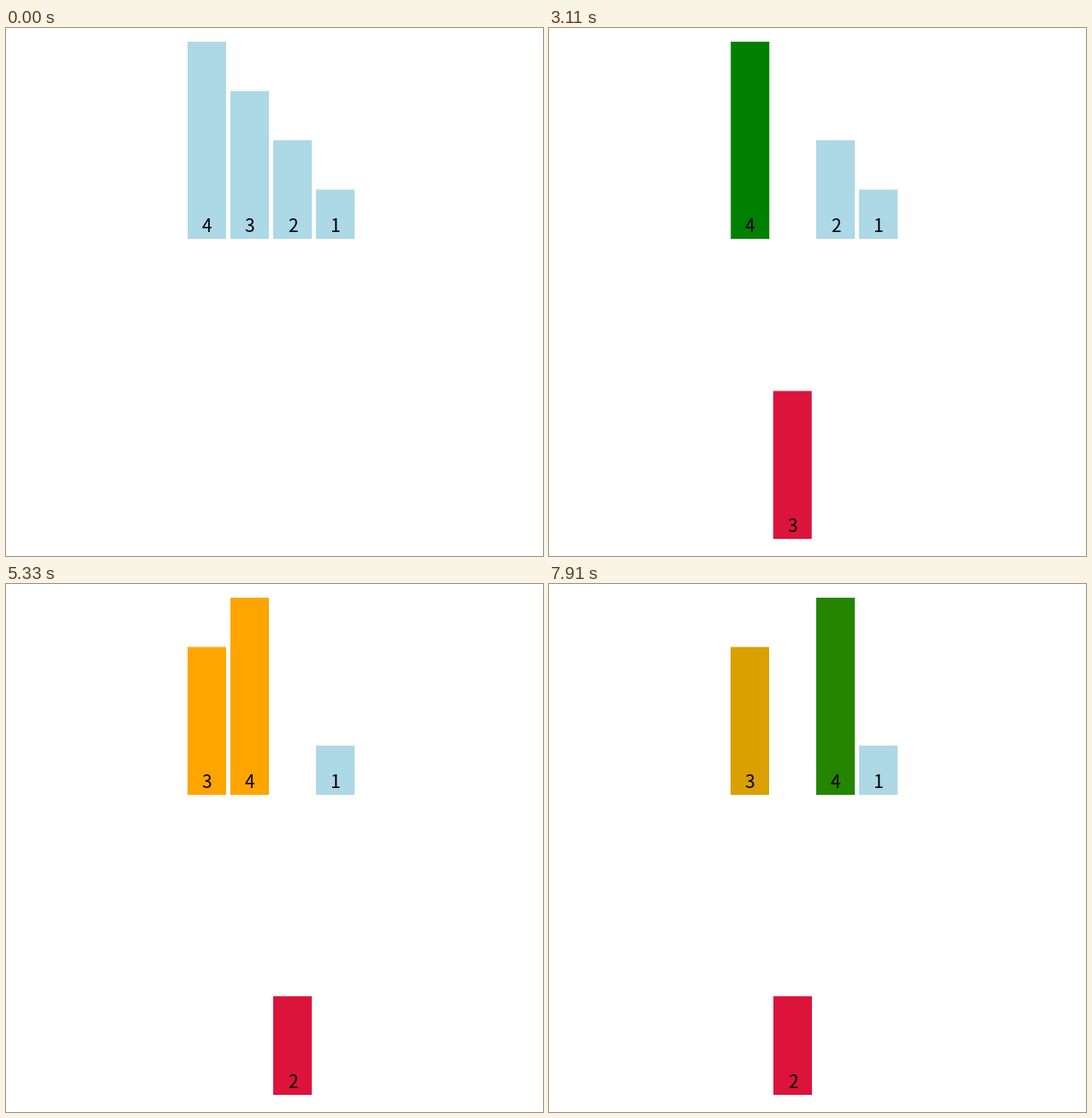
Write a matplotlib script that moves like this. It is 627x616 px and loops after 7.99 s.

```python
import matplotlib.pyplot as plt
import numpy as np
from matplotlib.animation import FuncAnimation
from matplotlib.colors import to_rgb
from matplotlib.patches import Rectangle

W, H, DPI = 627, 616, 64
LOOP, TICK = 7990, 10
LEFT, PITCH, BAR_W, UNIT = 212, 50, 45, 57.5
BASE, DROP = 246, 350
DURATION = 250
FONT_PX = 21

IDLE, SORTED, PICKED, COMPARED = "lightblue", "orange", "crimson", "green"

# Each stage: start of the transition, moments at which the view refreshes,
# and the new (slot, lowered, colour) of every bar that changes.
STAGES = [
    (265, (310, 390, 470, 550), {4: (0, 0, SORTED)}),
    (1237, (1250, 1330, 1410, 1470, 1530), {3: (1, 1, PICKED)}),
    (2118, (2200, 2280, 2340), {4: (0, 0, COMPARED)}),
    (3083, (3110, 3190, 3260, 3320, 3400),
     {4: (1, 0, COMPARED), 3: (0, 1, PICKED)}),
    (4065, (4110, 4190, 4270, 4350),
     {4: (1, 0, SORTED), 3: (0, 0, SORTED)}),
    (5035, (5060, 5130, 5200, 5260, 5330), {2: (2, 1, PICKED)}),
    (5940, (5990, 6060, 6130, 6200), {4: (1, 0, COMPARED)}),
    (6910, (6990, 7070, 7130, 7190),
     {4: (2, 0, COMPARED), 2: (1, 1, PICKED)}),
    (7827, (7910,), {4: (2, 0, SORTED), 3: (0, 0, COMPARED)}),
]
REFRESH = [0] + [t for _, steps, _ in STAGES for t in steps]


def pose(slot, lowered, colour):
    """Bar state as one vector: left, bottom, r, g, b."""
    return np.array([LEFT + PITCH * slot, BASE + DROP * lowered, *to_rgb(colour)])


def ease(t):
    t = min(max(t, 0), 1)
    return 4 * t ** 3 if t < 0.5 else 1 - 4 * (1 - t) ** 3


def poses_at(ms):
    shown = max(t for t in REFRESH if t <= ms)
    state = {v: pose(4 - v, 0, IDLE) for v in (4, 3, 2, 1)}
    for start, _, changes in STAGES:
        k = ease((shown - start) / DURATION)
        for value, goal in changes.items():
            state[value] = state[value] * (1 - k) + pose(*goal) * k
    return state


fig = plt.figure(figsize=(W / DPI, H / DPI), dpi=DPI, facecolor="white")
ax = fig.add_axes([0, 0, 1, 1])
ax.set_xlim(0, W)
ax.set_ylim(H, 0)
ax.axis("off")

bars, labels = {}, {}
for value in (4, 3, 2, 1):
    bars[value] = ax.add_patch(
        Rectangle((0, 0), BAR_W, UNIT * value, linewidth=0, snap=False))
    labels[value] = ax.text(0, 0, str(value), ha="center", va="baseline",
                            family="Noto Sans CJK JP", color="black",
                            fontsize=FONT_PX * 72 / DPI)


def draw(frame):
    for value, (x, bottom, *rgb) in poses_at(frame * TICK).items():
        bars[value].set_xy((x, bottom - UNIT * value))
        bars[value].set_facecolor(np.clip(rgb, 0, 1))
        labels[value].set_position((x + BAR_W / 2, bottom - 8))
    return [*bars.values(), *labels.values()]


anim = FuncAnimation(fig, draw, frames=LOOP // TICK, interval=TICK,
                     repeat=True, repeat_delay=0, cache_frame_data=False)
plt.show()
```
